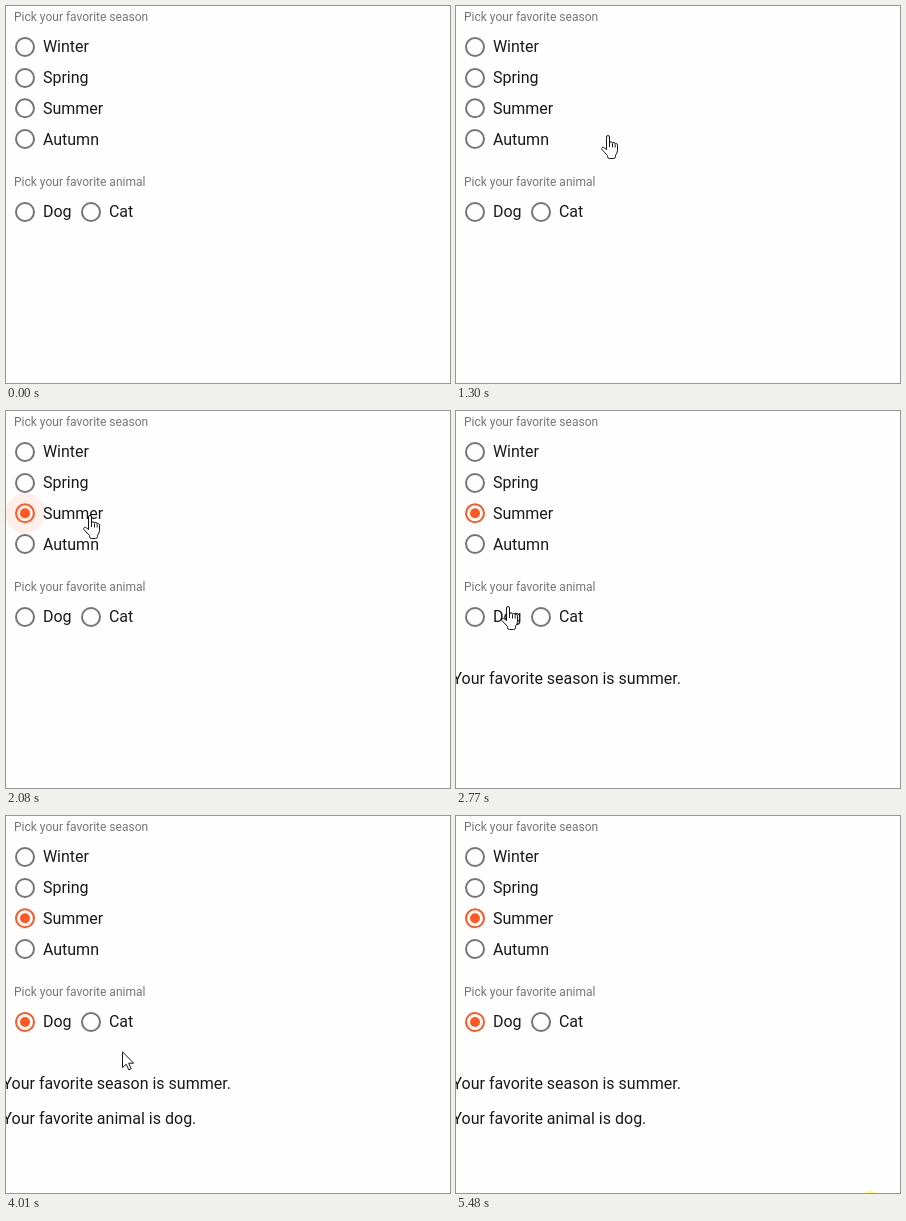
An HTML page that plays this animation: 444x377 px, repeating every 5560 ms.

```html
<!DOCTYPE html>
<html lang="en">
<head>
<meta charset="utf-8">
<title>Radio groups</title>
<style>
  html, body { margin: 0; width: 100%; height: 100%; overflow: hidden; background: #fefefe; }
  svg { display: block; width: 444px; height: 377px; }
  text { font: 16px Roboto, sans-serif; fill: rgba(0, 0, 0, .9); }
  .caption { font-size: 12px; fill: rgba(0, 0, 0, .54); }
  .ring { fill: none; stroke-width: 2; }
  .accent { fill: #ff5722; }
  .cursor path { fill: #fff; stroke: #15151f; stroke-linejoin: round; }
  .cursor .crease { fill: none; }
</style>
</head>
<body>
<svg viewBox="0 0 444 377">
  <text class="caption" x="8" y="15">Pick your favorite season</text>
  <text class="caption" x="8" y="180">Pick your favorite animal</text>
  <g id="radios"></g>
  <text id="season" x="-3.5" y="273">Your favorite season is summer.</text>
  <text id="animal" x="-3.5" y="308">Your favorite animal is dog.</text>
  <circle id="click" cx="414" cy="385" r="10" fill="#ff0" fill-opacity=".5"/>
  <g id="arrow" class="cursor">
    <path d="M.5 .8V16.6L4.2 13.2L6.8 18.8L9.2 17.8L6.7 12.2H11.6Z"/>
  </g>
  <g id="hand" class="cursor">
    <path d="M5.5 14.5V2q0-1.5 1.5-1.5T8.5 2v6q.2-1.3 1.5-1.2T11.5 8.3q.2-1 1.4-.9T14.2 9.2q.4-.9 1.3-.7T16.5 10.2v5q0 3-2 5v1.5q0 1.8-2 1.8H8.5q-2 0-2-2v-1L1 14.6Q.3 13.2 1.3 12.5T3.5 13Z"/>
    <path class="crease" d="M8.5 8v4M11.5 8.5v4M14.2 9.5v3"/>
  </g>
</svg>
<script>
const LOOP = 5560, START = 372, STEP = 77.2;
const byId = id => document.getElementById(id);
const clamp = v => Math.max(0, Math.min(1, v));
const show = (node, on) => node.setAttribute('visibility', on ? 'visible' : 'hidden');

function add(parent, tag, attrs, text = '') {
  const node = document.createElementNS('http://www.w3.org/2000/svg', tag);
  for (const name in attrs) node.setAttribute(name, attrs[name]);
  node.textContent = text;
  return parent.appendChild(node);
}

// label, centre x, centre y, baseline, step of the click
const radios = [
  ['Winter', 19, 41, 46],
  ['Spring', 19, 72, 77],
  ['Summer', 19, 102.3, 108, 18],
  ['Autumn', 19, 133, 139],
  ['Dog', 19, 206, 211, 34],
  ['Cat', 85, 206, 211]
].map(([label, cx, cy, y, click = Infinity]) => {
  const circle = (cls, r) => add(byId('radios'), 'circle', { class: cls, cx, cy, r });
  const radio = { click, halo: circle('accent', 0), ring: circle('ring', 9), dot: circle('accent', 0) };
  radio.halo.setAttribute('opacity', .09);
  add(byId('radios'), 'text', { x: cx + 17.9, y }, label);
  return radio;
});

function drawRadio({ click, halo, ring, dot }, step) {
  const age = step - click;
  const p = clamp(age / 4);
  const mix = (from, to) => Math.round(from + (to - from) * p);
  halo.setAttribute('r', age < 5 ? 20 * clamp(age / 3) : 0);
  dot.setAttribute('r', 5 * p * p * (3 - 2 * p));
  ring.setAttribute('stroke', `rgb(${mix(117, 255)},${mix(117, 87)},${mix(117, 34)})`);
}

// pointer path: step, x, y
const path = [
  [0, 348, 370], [7, 313, 278], [12, 151, 129], [15, 97, 105], [17, 83, 104],
  [24, 83, 104], [31, 51, 195], [34, 48, 206], [44, 48, 206],
  [52, 327, 332], [53, 351, 347], [56, 383, 367]
];

const slope = (i, axis) => (path[i + 1][axis] - path[i][axis]) / (path[i + 1][0] - path[i][0]);

// Harmonic mean keeps the curve from overshooting its rests.
function tangent(i, axis) {
  if (i === 0) return slope(0, axis);
  if (i === path.length - 1) return slope(i - 1, axis);
  const a = slope(i - 1, axis), b = slope(i, axis);
  return a * b > 0 ? 2 * a * b / (a + b) : 0;
}

function pointer(step, axis) {
  let i = 0;
  while (i < path.length - 2 && step >= path[i + 1][0]) i++;
  const [a, b] = [path[i], path[i + 1]];
  const h = b[0] - a[0], u = (step - a[0]) / h, v = 1 - u;
  return v * v * (1 + 2 * u) * a[axis] + u * u * (3 - 2 * u) * b[axis]
    + h * u * v * (v * tangent(i, axis) - u * tangent(i + 1, axis));
}

function draw(time) {
  const step = Math.floor((time % LOOP - START) / STEP);
  radios.forEach(radio => drawRadio(radio, step));
  show(byId('season'), step >= 23);
  show(byId('animal'), step >= 39);
  show(byId('click'), step >= 66);

  const visible = step >= 0 && step < 57;
  const x = Math.round(pointer(step, 1)), y = Math.round(pointer(step, 2));
  const onLabel = (y < 149 && x < 200) || (y > 189 && y < 222 && x < 135);
  show(byId('arrow'), visible && !onLabel);
  show(byId('hand'), visible && onLabel);
  byId('arrow').setAttribute('transform', `translate(${x} ${y})`);
  byId('hand').setAttribute('transform', `translate(${x - 6} ${y})`);
}

const begin = performance.now();
function tick() {
  draw(performance.now() - begin);
  requestAnimationFrame(tick);
}
tick();
</script>
</body>
</html>
```
